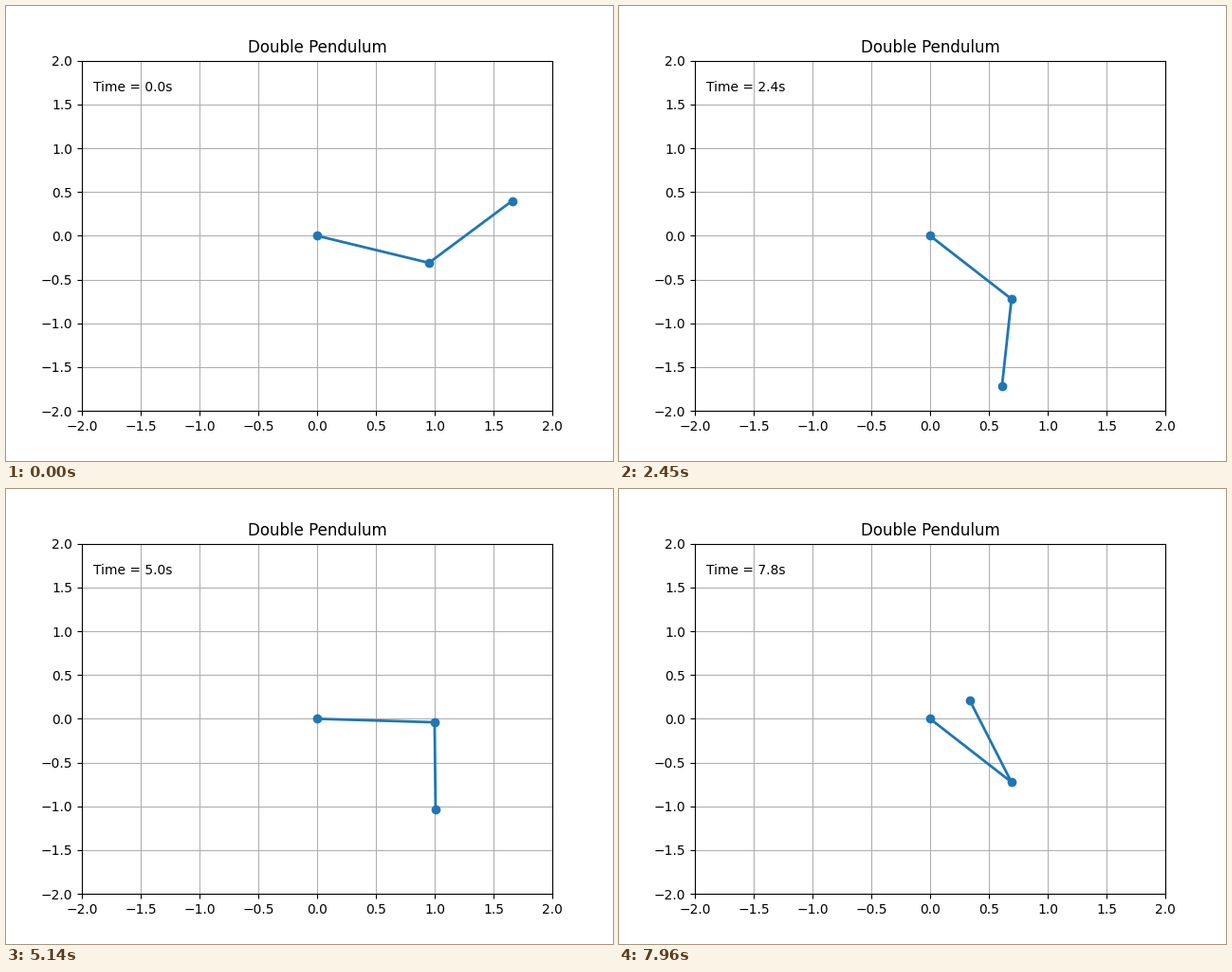
A matplotlib script that plays this animation: 640 by 480 pixels, repeating every 8000 ms.

```python
import numpy as np
import matplotlib.pyplot as plt
from matplotlib.animation import FuncAnimation

G = 9.81
DT = 0.04
FRAMES = 196
LOOP_MS = 8000
SUBSTEPS = 20


def deriv(s):
    """Equal unit masses on unit rods; s = (a1, w1, a2, w2)."""
    a1, w1, a2, w2 = s
    c, sn = np.cos(a1 - a2), np.sin(a1 - a2)
    den = 2 - c * c
    f1 = -w2 * w2 * sn - 2 * G * np.sin(a1)
    f2 = w1 * w1 * sn - G * np.sin(a2)
    return np.array([w1, (f1 - c * f2) / den, w2, (2 * f2 - c * f1) / den])


def rk4(s, h):
    k1 = deriv(s)
    k2 = deriv(s + h / 2 * k1)
    k3 = deriv(s + h / 2 * k2)
    k4 = deriv(s + h * k3)
    return s + h / 6 * (k1 + 2 * k2 + 2 * k3 + k4)


def simulate(state):
    states = [state]
    for _ in range(FRAMES - 1):
        for _ in range(SUBSTEPS):
            state = rk4(state, DT / SUBSTEPS)
        states.append(state)
    return np.array(states)


path = simulate(np.array([2 * np.pi / 5, 0.0, 3 * np.pi / 4, 0.0]))
x1, y1 = np.sin(path[:, 0]), -np.cos(path[:, 0])
x2, y2 = x1 + np.sin(path[:, 2]), y1 - np.cos(path[:, 2])

fig, ax = plt.subplots(figsize=(6.4, 4.8), dpi=100)
ax.set_xlim(-2, 2)
ax.set_ylim(-2, 2)
ax.set_title("Double Pendulum")
ax.grid()
rods, = ax.plot([], [], "o-", lw=2)
clock = ax.text(-1.9, 1.65, "")


def update(i):
    rods.set_data([0, x1[i], x2[i]], [0, y1[i], y2[i]])
    clock.set_text(f"Time = {i * DT:.1f}s")
    return rods, clock


anim = FuncAnimation(fig, update, frames=FRAMES, interval=LOOP_MS / FRAMES,
                     repeat=True, repeat_delay=0)
plt.show()
```
